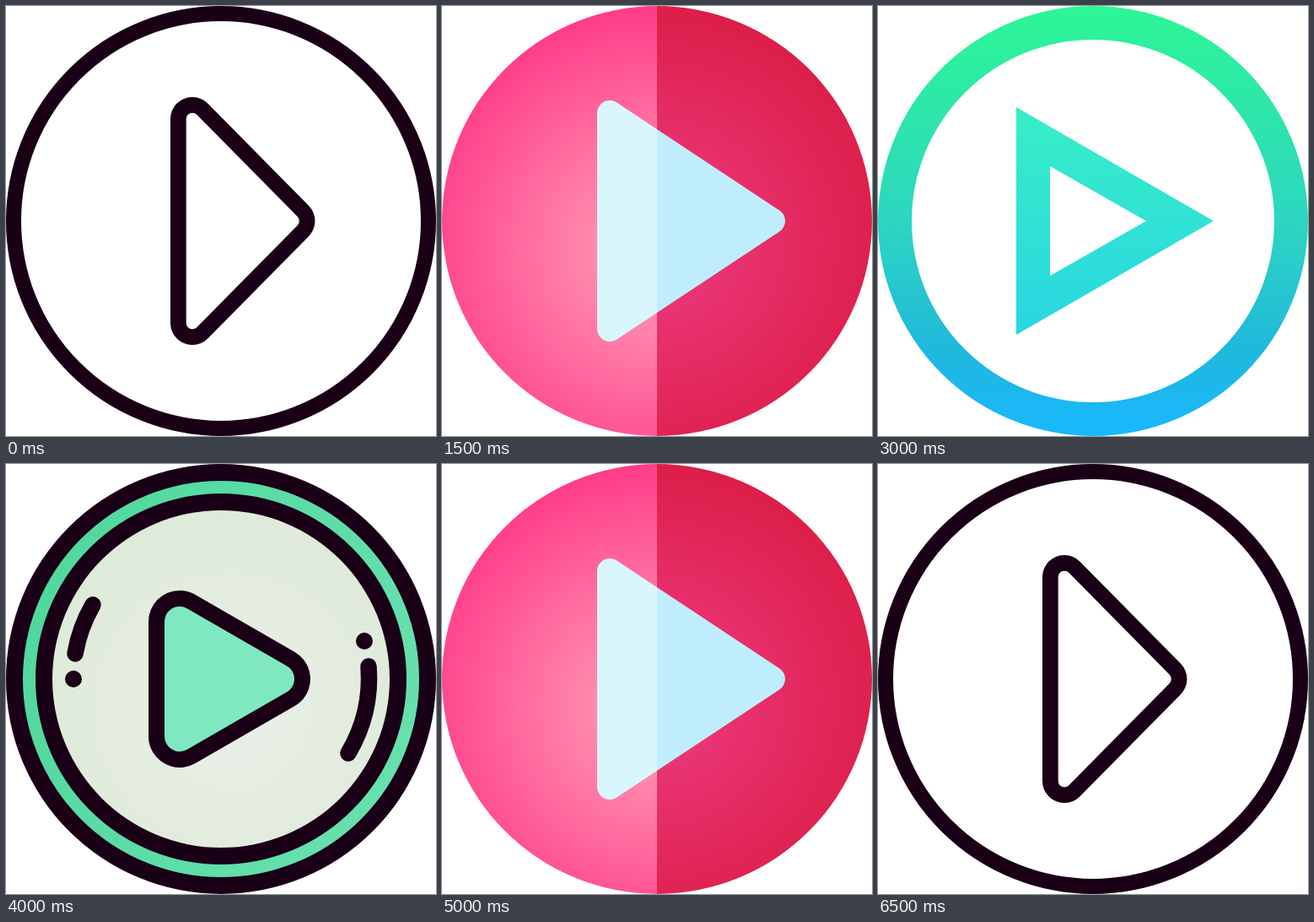
An HTML page for the animation above (7000 ms loop, 510 by 510 pixels).

```html
<!DOCTYPE html>
<html lang="en">
<head>
<meta charset="utf-8">
<title>Play buttons</title>
<style>
  html, body { margin: 0; width: 100%; height: 100%; overflow: hidden; background: #fff; }
  svg { display: block; width: 100%; height: 100%; }
  .pic { opacity: 0; }
  .line { fill: none; stroke: #1a0016; stroke-linecap: round; stroke-linejoin: round; }
  .round { stroke-linejoin: round; }
</style>
</head>
<body>
<svg viewBox="0 0 510 510">
  <defs>
    <radialGradient id="red" gradientUnits="userSpaceOnUse" cx="255" cy="275" r="250">
      <stop offset="0" stop-color="#e60060"/><stop offset="1" stop-color="#d40037"/>
    </radialGradient>
    <linearGradient id="sea" gradientUnits="userSpaceOnUse" x1="0" y1="0" x2="0" y2="510">
      <stop offset="0" stop-color="#2df696"/><stop offset=".5" stop-color="#2dd6c0"/>
      <stop offset=".8" stop-color="#20b8dc"/><stop offset="1" stop-color="#18b8ff"/>
    </linearGradient>
    <linearGradient id="aqua" gradientUnits="userSpaceOnUse" x1="0" y1="120" x2="0" y2="390">
      <stop offset="0" stop-color="#38eec6"/><stop offset="1" stop-color="#28d6e2"/>
    </linearGradient>
    <radialGradient id="cream" gradientUnits="userSpaceOnUse" cx="265" cy="290" r="230">
      <stop offset="0" stop-color="#ebefe8"/><stop offset="1" stop-color="#deeada"/>
    </radialGradient>
    <linearGradient id="mint" gradientUnits="userSpaceOnUse" x1="20" y1="150" x2="490" y2="360">
      <stop offset="0" stop-color="#50d89d"/><stop offset="1" stop-color="#68e0b0"/>
    </linearGradient>
    <radialGradient id="pink" gradientUnits="userSpaceOnUse" cx="255" cy="290" r="290">
      <stop offset="0" stop-color="#ffa4b8"/><stop offset=".55" stop-color="#ff6ca0"/>
      <stop offset="1" stop-color="#ff3c88"/>
    </radialGradient>
    <radialGradient id="rose" gradientUnits="userSpaceOnUse" cx="255" cy="280" r="280">
      <stop offset="0" stop-color="#ee3c84"/><stop offset="1" stop-color="#dc1e48"/>
    </radialGradient>
    <clipPath id="left"><rect width="255" height="510"/></clipPath>
    <clipPath id="right"><rect x="255" width="255" height="510"/></clipPath>
  </defs>
</svg>
<script>
  const DARK = '#1a0016';
  const STEP = 500, STEPS = 14;

  const disc = (r, fill, x = 255, y = 255) =>
    `<circle cx="${x}" cy="${y}" r="${r}" fill="${fill}"/>`;
  const ring = (outer, inner, color) =>
    `<circle cx="255" cy="255" r="${(outer + inner) / 2}" fill="none" stroke="${color}" stroke-width="${outer - inner}"/>`;
  const line = (d, width) => `<path class="line" d="${d}" stroke-width="${width}"/>`;

  // Triangle pointing right, symmetric about the middle row, grown by radius r
  const tri = (x, y, tip, fill, r = 0) =>
    `<path class="round" d="M${x} ${y}L${tip} 255L${x} ${510 - y}Z" fill="${fill}"` +
    (r ? ` stroke="${fill}" stroke-width="${2 * r}"` : '') + '/>';
  const half = (side, art) => `<g clip-path="url(#${side})">${art}</g>`;

  const pics = [
    ring(255, 237, DARK) + tri(221, 134, 340.5, DARK, 26) + tri(221, 134, 340.5, '#fff', 7.3),

    ring(255, 237, DARK) + tri(192, 129, 381, DARK),

    disc(255, DARK) + tri(192, 129, 381, '#fff'),

    half('left', disc(255, 'url(#pink)') + tri(199, 127, 392, '#d8f6fc', 15)) +
    half('right', disc(255, 'url(#rose)') + tri(199, 127, 392, '#c0edfc', 15)),

    disc(240, 'url(#red)') + ring(248, 231, DARK) +
    tri(207.5, 167, 353, '#e8eee0') + line('M207.5 167L353 255L207.5 343Z', 15.5) +
    line('M40 255A215 215 0 0 0 176 455M199 463A215 215 0 0 0 215 466', 16),

    disc(255, DARK) + ring(235, 220, 'url(#mint)') + disc(200, 'url(#cream)') +
    tri(206, 187, 324, DARK, 37) + tri(206, 187, 324, '#80e8c0', 18) +
    line('M103 167A175.5 175.5 0 0 0 82 225M430 240A175.5 175.5 0 0 1 406 343', 19.5) +
    disc(10, DARK, 80, 255) + disc(10, DARK, 425, 210),

    ring(255, 215, 'url(#sea)') + tri(164, 120, 398, 'url(#aqua)') + tri(204, 190, 318, '#fff')
  ];

  const svg = document.querySelector('svg');
  svg.insertAdjacentHTML('beforeend', pics.map(p => `<g class="pic">${p}</g>`).join(''));

  // The pictures run forward, then back
  document.querySelectorAll('.pic').forEach((g, n) => {
    const frames = Array.from({ length: STEPS + 1 }, (_, i) => ({
      offset: i / STEPS,
      opacity: i === n || i === STEPS - 1 - n ? 1 : 0,
      easing: 'step-end'
    }));
    g.animate(frames, { duration: STEP * STEPS, iterations: Infinity });
  });
</script>
</body>
</html>
```
